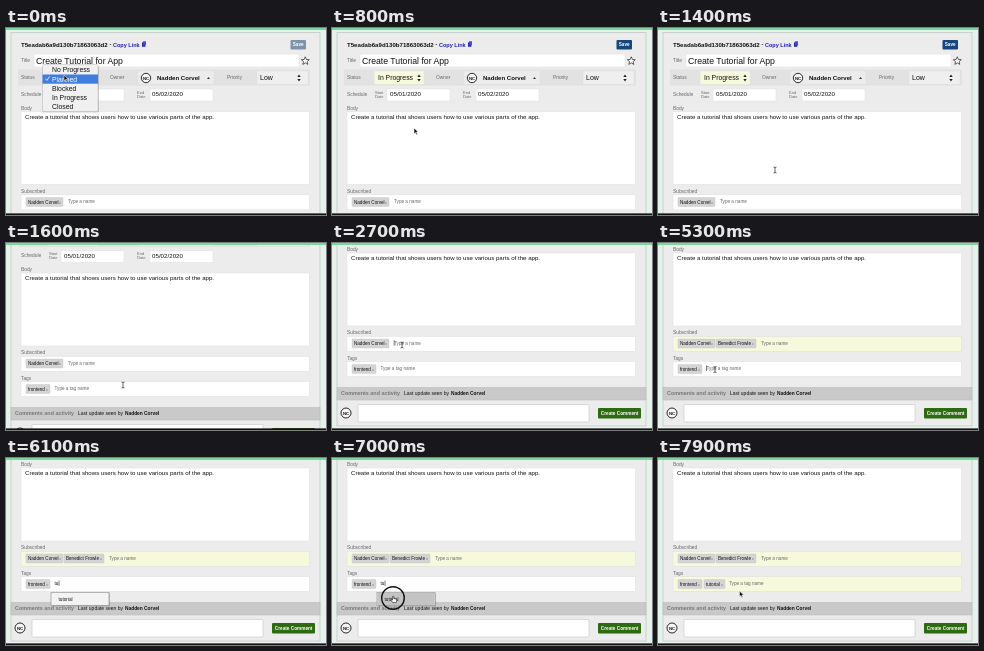
An HTML page for the animation above (8 s loop, 320 px wide and 187 px high).

```html
<!DOCTYPE html>
<html lang="en">
<head>
<meta charset="utf-8">
<title>Task form</title>
<style>
html, body { margin: 0; width: 100%; height: 100%; overflow: hidden; background: #e6f1ec; }
svg { display: block; width: 100%; height: 100%; }
text { font-family: "Liberation Sans", Arial, sans-serif; white-space: pre; }
</style>
</head>
<body>
<svg id="stage" viewBox="0 0 320 187" preserveAspectRatio="none"></svg>
<script>
const LOOP = 8000, STEP = 100, END = 73.5;
const OWNER = 'Nadden Corvel', INITIALS = 'NC', FRIEND = 'Benedict Frowle', OTHER = 'Bettany Corse';
const GREY = '#ececec', YELLOW = '#f7f9dc', LABEL = '#686868', INK = '#111';

const rect = (x, y, w, h, fill, more = '') =>
  `<rect x="${x}" y="${y}" width="${w}" height="${h}" fill="${fill}" ${more}/>`;
const text = (x, y, s, size, fill = INK, more = '') =>
  `<text x="${x}" y="${y}" font-size="${size}" fill="${fill}" ${more}>${s}</text>`;
const bold = (x, y, s, size, fill, more = '') => text(x, y, s, size, fill, 'font-weight="700" ' + more);
const label = (x, y, s) => text(x, y, s, 4.85, LABEL);
const path = (d, fill, more = '') => `<path d="${d}" fill="${fill}" ${more}/>`;
const field = (x, y, w, h, fill = '#fff') => rect(x, y, w, h, fill, 'stroke="#dedede" stroke-width=".5"');
const between = (t, a, b) => t >= a && t < b;

function avatar(x, y, r, size) {
  return `<circle cx="${x}" cy="${y}" r="${r}" fill="#f6f6f6" stroke="#111" stroke-width=".9"/>` +
    bold(x, y + size * .36, INITIALS, size, INK, 'text-anchor="middle"');
}

function chip(x, y, w, s) {
  return rect(x, y, w, 9, '#d4d4d4', 'rx=".8" stroke="#c2c2c2" stroke-width=".4"') +
    text(x + 2, y + 6.1, s, 4.6) + text(x + w - 4, y + 6, 'x', 3.8, '#777');
}

const spin = (x, y) => path(`M${x - 1.7} ${y - .9}l1.7-2.6 1.7 2.6zM${x - 1.7} ${y + .9}l1.7 2.6 1.7-2.6z`, '#222');

function star(cx, cy, r) {
  let d = '';
  for (let i = 0; i < 10; i++) {
    const a = i * Math.PI / 5 - Math.PI / 2, k = i % 2 ? r * .45 : r;
    d += (i ? 'L' : 'M') + (cx + k * Math.cos(a)).toFixed(2) + ' ' + (cy + k * Math.sin(a)).toFixed(2);
  }
  return path(d + 'z', '#fafafa', 'stroke="#222" stroke-width=".7"');
}

// Linear track of [time, value, value...]
function track(keys, t) {
  if (t <= keys[0][0]) return keys[0].slice(1);
  for (let i = 1; i < keys.length; i++) {
    const a = keys[i - 1], b = keys[i];
    if (t <= b[0]) {
      const k = (t - a[0]) / (b[0] - a[0]);
      return a.slice(1).map((v, j) => v + (b[j + 1] - v) * k);
    }
  }
  return keys[keys.length - 1].slice(1);
}

const scrollKeys = [[1400, 0], [1500, 22], [1600, 53.5], [1700, END]];
const mouseKeys = [
  [0, 58, 47], [100, 60, 57], [200, 60, 65], [300, 60, 68.5], [500, 60, 68.5],
  [800, 82, 100], [1100, 110, 134], [1300, 117, 142], [1900, 117, 142],
  [2200, 92, 118], [2400, 73, 100], [2500, 73, 100], [2700, 70, 102], [3500, 70, 102],
  [4000, 70, 115], [4600, 70, 115], [5000, 60, 124], [5100, 60, 124], [5300, 57, 126.5],
  [6400, 57, 126.5], [6900, 61, 140], [7300, 61, 140], [7600, 72, 139], [7900, 81.5, 133]
];
const clicks = [[2400, 2600, 73, 100], [4200, 4400, 70, 116], [5000, 5200, 60, 124], [7000, 7100, 61, 140]];

function fixedPage() {
  return rect(5, 4.5, 309, 252, GREY, 'stroke="#bcc5c0" stroke-width=".7"') +
    bold(15, 18.6, 'T5eadab6a9d130b71863063d2', 6.1) + bold(103.6, 18.4, '-', 5.5) +
    bold(107, 18.5, 'Copy Link', 5.5, '#2222b4') +
    rect(136, 14.2, 3.4, 4.6, '#2222b4', 'rx=".5"') + rect(137, 13.2, 3, 4, '#4a4ad0', 'rx=".4"') +
    label(15, 34.2, 'Title') + field(28, 26, 265, 13) + text(30, 35.7, 'Create Tutorial for App', 8.7) +
    star(299.3, 33, 4.2) +
    rect(12, 41.5, 292, 16, '#e2e2e2') +
    label(15, 51.3, 'Status') + label(104, 51.3, 'Owner') +
    field(132, 43, 76, 13.5, '#ececec') + avatar(140, 50, 4.7, 4.3) + bold(151, 52.2, OWNER, 6.05) +
    path('M201 51l1.5-2 1.5 2z', '#333') +
    label(221, 51.3, 'Priority') + field(251, 43, 51, 13.5, '#efefef') + text(254, 52.2, 'Low', 7) + spin(293, 50) +
    label(15, 67.8, 'Schedule') +
    text(43, 65.5, 'Start', 4, LABEL) + text(43, 69.8, 'Date', 4, LABEL) + field(55, 61, 63, 12) +
    text(58, 68.3, '05/01/2020', 6.2) +
    text(131, 65.5, 'End', 4, LABEL) + text(131, 69.8, 'Date', 4, LABEL) + field(144, 61, 63, 12) +
    text(146, 68.3, '05/02/2020', 6.2) +
    label(15, 81.5, 'Body') + field(15, 83.5, 288.5, 73) +
    text(19, 90.9, 'Create a tutorial that shows users how to use various parts of the app.', 6.1) +
    label(15, 164.7, 'Subscribed') + label(15, 190.2, 'Tags') +
    rect(5, 218, 309, 12.5, '#c9c9c9', 'stroke="#b5b5b5" stroke-width=".5"') +
    bold(9, 225.4, 'Comments and activity', 5.4, '#777') +
    text(72, 225.4, 'Last update seen by', 5) + bold(119, 225.4, OWNER, 4.85) +
    avatar(14, 243.5, 5, 4.3) +
    rect(26, 235, 231, 17.5, '#fff', 'rx="1" stroke="#c4c4c4" stroke-width=".6"') +
    rect(266, 238.5, 43, 10.5, '#2d6a12', 'rx="1"') + bold(268.8, 245.5, 'Create Comment', 4.72, '#fff');
}

function menu(t) {
  const hot = t < 100 ? 1 : t < 200 ? 2 : 3;
  const items = ['No Progress', 'Planned', 'Blocked', 'In Progress', 'Closed'];
  return rect(36.5, 37.5, 56.5, 47, '#000', 'opacity=".18" rx="1.5"') +
    rect(36.5, 36.5, 55.5, 47, '#f0f0f0', 'rx="1.5" stroke="#bbb" stroke-width=".5"') +
    rect(36.5, 46.5 + (hot - 1) * 9.1, 55.5, 9.2, '#3f7de0') +
    path('M39.5 50.7l1.4 1.8 2.6-4', 'none', `stroke="${hot === 1 ? '#fff' : '#222'}" stroke-width=".8"`) +
    items.map((s, i) => text(46, 44.4 + i * 9.1, s, 6.85, i === hot ? '#fff' : INK)).join('');
}

function list(x, y, items, hot) {
  const h = 13 * items.length;
  return rect(x + .7, y + .8, 58, h, '#000', 'opacity=".28"') +
    rect(x, y, 58, h, '#f3f3f3', 'stroke="#8d8d8d" stroke-width=".6"') +
    items.map((s, i) => (i === hot ? rect(x + .4, y + .4 + i * 13, 57.2, 12.2, '#c4c4c4') : '') +
      text(x + 7.5, y + 8 + i * 13, s, 4.7)).join('');
}

// Chip box: yellow once changed, then chips, typed text or placeholder, caret
function chipBox(y, chips, changed, x, typed, hint, caret) {
  return field(15, y, 288.5, 15, changed ? YELLOW : '#fff') + chips +
    (typed ? text(x, y + 8.3, typed, 4.65) : text(x, y + 8.3, hint, 4.65, '#666')) +
    (caret ? rect(x + typed.length * 2.2 - .2, y + 4, .6, 5.4, '#222') : '');
}

function livePage(t) {
  const added = t >= 4300, tagged = t >= 7100, fade = Math.min(1, Math.max(0, (t - 400) / 400));
  const mix = (a, b) => Math.round(a + (b - a) * fade);
  const save = `rgb(${mix(126, 24)},${mix(147, 70)},${mix(170, 122)})`;
  const who = between(t, 3100, 4300) ? (t < 3200 ? 'b' : 'be') : '';
  const tag = between(t, 5900, 7100) ? (t < 6100 ? 't' : 'tu') : '';
  let s = rect(284.5, 12, 15.5, 9.5, save, 'rx="1"') + bold(286.8, 18.4, 'Save', 4.6, '#fff') +
    field(42, 43, 50, 13.5, YELLOW) + text(46, 52.2, 'In Progress', 6.85) + spin(87, 50);
  s += chipBox(166.8, chip(20, 169.5, 37, OWNER) + (added ? chip(58, 169.5, 40, FRIEND) : ''),
    added, added ? 103 : 62, who, 'Type a name', between(t, 2500, 5100));
  s += chipBox(192, chip(20, 195, 24, 'frontend') + (tagged ? chip(46, 195, 21, 'tutorial') : ''),
    tagged, tagged ? 71 : 48.5, tag, 'Type a tag name', between(t, 5100, 5700) || between(t, 5900, 7600));
  if (t < 500) s += menu(t);
  if (who) s += list(58, 182.5, [FRIEND, OTHER], t >= 3900 ? 0 : -1);
  if (tag) s += t < 6100 ? list(45, 208, ['testing', 'tooling', 'tutorial', 'theme'], -1)
    : list(45, 208, ['tutorial'], t >= 6800 ? 0 : -1);
  return s;
}

function pointer(t) {
  const [x, y] = track(mouseKeys, t);
  const ring = clicks.find(c => between(t, c[0], c[1]));
  let s = ring ? `<circle cx="${ring[2]}" cy="${ring[3]}" r="11.3" fill="none" stroke="#111" stroke-width="1.4"/>` : '';
  if (between(t, 3100, 3600) || between(t, 5900, 6500)) return s;
  const beam = between(t, 900, 3800) || between(t, 4900, 6700);
  const hand = between(t, 3900, 4300) || between(t, 6800, 7100);
  const shape = beam
    ? path('M-1.5-3Q0-3 0-2Q0-3 1.5-3M0-2V2M-1.5 3Q0 3 0 2Q0 3 1.5 3', 'none', 'stroke="#222" stroke-width=".7"')
    : hand
    ? path('M-.6-1.5q.7-.8 1.3 0v2l2.4.6q.7.3.6 1.2l-.5 2.4h-3.4l-2-2.6q.2-.8 1.6 0z', '#fff', 'stroke="#111" stroke-width=".6"')
    : path('M0 0v5.8l1.4-1.3 1 2.2 1-.5-1-2.1h1.8z', '#111', 'stroke="#fff" stroke-width=".5"');
  return s + `<g transform="translate(${x.toFixed(2)} ${y.toFixed(2)})">${shape}</g>`;
}

document.getElementById('stage').innerHTML =
  rect(0, 0, 320, 187, '#e6f1ec') +
  `<g id="page">${fixedPage()}<g id="live"></g></g>` +
  rect(0, 0, 320, 2, '#74d99b') + rect(0, 185.4, 320, 1.6, '#111') + '<g id="mouse"></g>';
const [page, live, mouse] = ['page', 'live', 'mouse'].map(id => document.getElementById(id));

let last = -1;
function draw(now) {
  const t = Math.floor((now % LOOP) / STEP) * STEP;
  if (t !== last) {
    last = t;
    page.setAttribute('transform', `translate(0 ${-track(scrollKeys, t)[0]})`);
    live.innerHTML = livePage(t);
    mouse.innerHTML = pointer(t);
  }
}
let start;
function tick(now) {
  if (start === undefined) start = now;
  draw(Math.max(0, now - start));
  requestAnimationFrame(tick);
}
draw(0);
requestAnimationFrame(tick);
</script>
</body>
</html>
```
